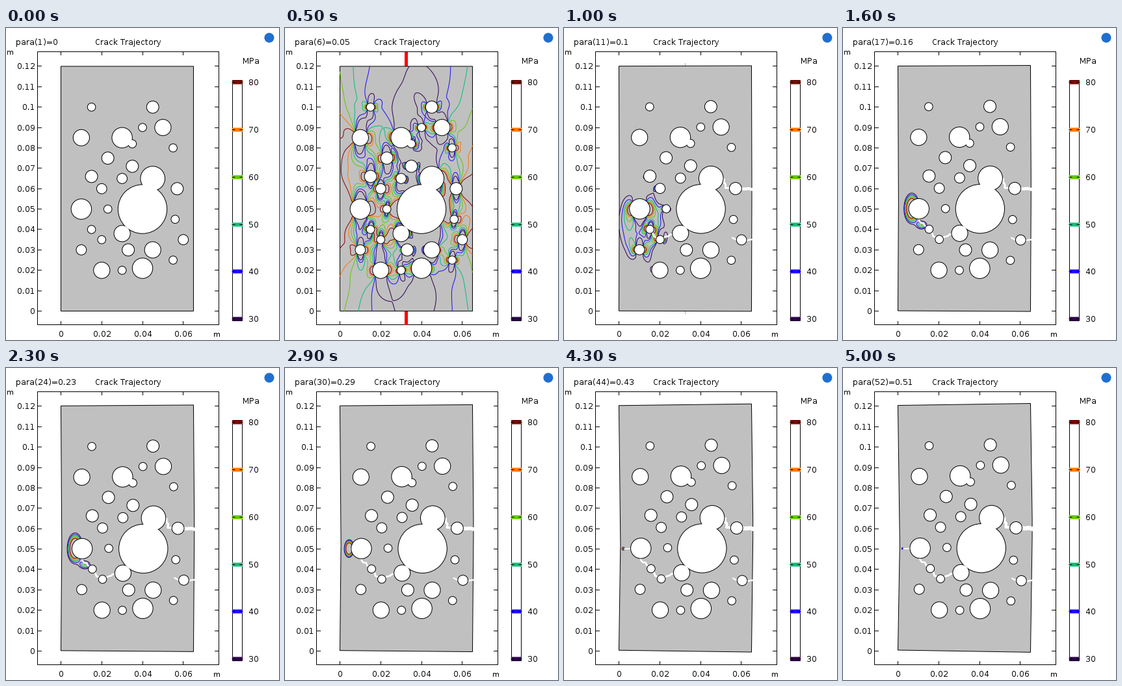
A matplotlib script that plays this animation: 420 by 480 pixels, repeating every 5.1 s.

```python
import numpy as np
import matplotlib.pyplot as plt
from matplotlib.animation import FuncAnimation
from matplotlib.patches import Circle, Polygon, Rectangle

plt.rcParams.update({"path.snap": False, "text.hinting": "native",
                     "text.hinting_factor": 1, "text.kerning_factor": 6,
                     "font.family": "DejaVu Sans"})

W, H, DPI = 420, 480, 100
PX = 72 / DPI                           # points per pixel
X0, Y0, SCALE = 84.5, 435.5, 3.138      # plate origin, pixels per mm
PLATE_W, PLATE_H = 65, 120
STEPS, BREAK = 51, 7

LEVELS = np.arange(30, 90, 10)
COLORS = ["#30004f", "#1e0aff", "#00c278", "#64c800", "#ff7800", "#8c0000"]

# hole centres by radius, in mm
CENTRES = {
    2: [(15, 100), (40, 90), (35, 82), (55, 80), (23, 50), (56, 45), (15, 40),
        (20, 35), (55, 25), (30, 20)],
    2.5: [(30, 65), (20, 60), (60, 35), (10, 30)],
    3: [(45, 100), (23, 75), (35, 71), (15, 66), (57, 60), (33, 30)],
    4: [(50, 90), (10, 85), (30, 38), (45, 30), (20, 20)],
    5: [(30, 85), (10, 50), (40, 21)],
    6: [(45, 65)],
    12: [(40, 50)],
}
HOLES = np.array([(x, y, r) for r, spots in CENTRES.items() for x, y in spots], float)

# line along which the plate parts, left edge to right edge
TRACK = np.array([(0, 49.7), (10, 50), (10.2, 44), (15, 40), (17, 36.5), (20, 35),
                  (25, 37.5), (30, 38), (40, 50), (45, 65), (51.3, 64.6),
                  (52, 60.3), (57, 60), (66, 60)])
SIDE = np.array([(55.6, 36), (60, 35), (66, 35)])


def jagged(points, rng):
    """Subdivide a path and shake the inner points."""
    out = [points[:1]]
    for a, b in zip(points, points[1:]):
        count = max(2, int(np.hypot(*(b - a)) / 1.2))
        t = np.linspace(0, 1, count + 1)[1:, None]
        shake = rng.normal(0, 0.25, (count, 2)) * (t < 1)
        out.append(a + (b - a) * t + shake)
    return np.vstack(out)


rng = np.random.default_rng(4)
# first step, line width, growth with opening, path
CRACKS = [(start, width, grow, jagged(points, rng)) for start, width, grow, points in [
    (7, 2.6, 1.5, TRACK[10:13]), (7, 4, 2.5, TRACK[12:]), (7, 2.4, 0, SIDE),
    (8, 2.5, 0.4, TRACK[5:8]), (9, 2.5, 0.4, TRACK[3:6]), (13, 2.3, 0.4, TRACK[1:4])]]


def hole_stress(x, y, hole, load):
    """Stress change around a circular hole in a uniform stress field."""
    dx, dy = x - hole[0], y - hole[1]
    q = np.minimum(hole[2] ** 2 / np.maximum(dx ** 2 + dy ** 2, 1e-6), 1)
    phi = np.arctan2(dy, dx)
    c, s = np.cos(2 * phi), np.sin(2 * phi)
    mean, dev, shear = (load[0] + load[1]) / 2, (load[0] - load[1]) / 2, load[2]
    normal = dev * c + shear * s
    rr = -mean * q + (3 * q ** 2 - 4 * q) * normal
    tt = mean * q - 3 * q ** 2 * normal
    rt = (2 * q - 3 * q ** 2) * (shear * c - dev * s)
    m, d = (rr + tt) / 2, (rr - tt) / 2
    return np.array([m + d * c - rt * s, m - d * c + rt * s, d * s + rt * c])


def far_stress(x, y):
    zero = np.zeros_like(x)
    waist = np.exp(-((y - 55) / 35) ** 2)
    return np.array([zero, 0.8 + (0.42 + 0.35 * waist) * ((x - 36) / 36) ** 2, zero])


def unit_stress(x, y):
    """First principal stress for a unit pull, with interacting holes."""
    hx, hy = HOLES[:, 0], HOLES[:, 1]
    loads = far_stress(hx, hy)
    for _ in range(4):
        new = far_stress(hx, hy)
        for i, hole in enumerate(HOLES):
            part = hole_stress(hx, hy, hole, loads[:, i])
            part[:, i] = 0
            new += part
        loads = (loads + new) / 2
    sx, sy, t = far_stress(x, y) + sum(
        hole_stress(x, y, h, loads[:, i]) for i, h in enumerate(HOLES))
    return (sx + sy) / 2 + np.hypot((sx - sy) / 2, t)


def bump(x, y, sx, sy, amp):
    return amp * np.exp(-((GX - x) / sx) ** 2 / 2 - ((GY - y) / sy) ** 2 / 2)


GX, GY = np.meshgrid(np.linspace(0, PLATE_W, 261), np.linspace(0, PLATE_H, 481))
PULL = unit_stress(GX, GY)
LEFT_PATCH = PULL * bump(12, 41, 7.5, 13, 60)


def ramp(n, start, end):
    return np.clip((n - start) / (end - start), 0, 1)


def ligament(n):
    """Centre, spreads and strength of the stress left of the last hole."""
    k, late = ramp(n, 24, 34), ramp(n, 34, 51)
    return (6.5 - 5 * k - 0.2 * late, 50.2 - 0.4 * k,
            2.1 - 1.6 * k - 0.15 * late, 4.1 - 3.45 * k - 0.3 * late,
            160 - 115 * late)


def stress(n):
    if n < BREAK:
        return 10 * n * PULL
    if n < 13:
        fade = 1 - ramp(n, 6, 10)
        return fade * PULL * bump(0, 60, 25, 60, 50) + (1 - fade) * LEFT_PATCH
    return bump(*ligament(n)) + bump(11.5, 42, 2, 1.6, 60 * (1 - ramp(n, 24, 28)))


def moved(x, y, s):
    """Pixel place of a plate point once the halves have swung open by s."""
    top = np.clip(0.5 + (y - np.interp(x, *TRACK.T)) / 8, 0, 1)
    u = x / PLATE_W
    px, py = X0 + SCALE * x, Y0 - SCALE * y
    dx = 0.0147 * SCALE * (top * (PLATE_H - y) + (1 - top) * y)
    up = top * (1.4 + 3 * u) + (1 - top) * (1.5 - 3.3 * u)
    return px + s * dx, py - s * up


def reset(ax):
    ax.cla()
    ax.set(xlim=(0, W), ylim=(H, 0))
    ax.axis("off")


def page_axes():
    ax = fig.add_axes([0, 0, 1, 1])
    reset(ax)
    return ax


def line(ax, xs, ys, color="black", width=1, **kw):
    ax.plot(xs, ys, color=color, lw=width * PX, **kw)


def frame(ax, left, top, right, bottom):
    ax.add_patch(Rectangle((left, top), right - left, bottom - top,
                           fill=False, ec="black", lw=PX))


def label(ax, x, y, text, size=12, **kw):
    ax.text(x, y, text, fontsize=size * PX, **kw)


def middle(v):
    """Centre of the pixel that holds v."""
    return np.floor(v) + 0.5


def draw_page(ax):
    label(ax, 137, 26, "Crack Trajectory")
    label(ax, 1.5, 41, "m", 11)
    label(ax, 319, 475, "m", 11)
    label(ax, 364, 55, "MPa")
    ax.add_patch(Circle((405, 15), 7.5, color="#1f6fd0", lw=0))

    left, top, right, bottom = 48.5, 36.5, 327.5, 456.5
    frame(ax, left, top, right, bottom)
    for i in range(13):
        y = middle(Y0 - 10 * i * SCALE)
        line(ax, [left, left + 6], [y, y])
        line(ax, [right - 6, right], [y, y])
        label(ax, 45, y + 4.5, f"{i / 100:g}", ha="right")
    for i in range(4):
        x = middle(X0 + 20 * i * SCALE)
        line(ax, [x, x], [top, top + 5])
        line(ax, [x, x], [bottom - 5, bottom])
        label(ax, x + 0.5, 475, f"{i / 50:g}", ha="center")

    frame(ax, 348.5, 80.5, 363.5, 450.5)
    for level, color in zip(LEVELS, COLORS):
        y = middle(447.7 - 7.28 * (level - 30))
        ax.add_patch(Rectangle((348, y - 3), 16, 6, color=color, lw=0))
        line(ax, [348, 352], [y, y])
        line(ax, [360, 364], [y, y])
        label(ax, 373, y + 4.5, str(level))


def draw_arrows(ax, n):
    """Pulling force, which all but vanishes after the break."""
    force = n if n < BREAK else 0.5 * (1 - ramp(n, 10, 14))
    length = min(10 * force, 22)
    for y in (59 - length, 435):
        ax.add_patch(Rectangle((186.5 - force / 2, y), force, length,
                               color="red", lw=0))


def draw_cracks(ax, n, s):
    for start, width, grow, path in CRACKS:
        if n >= start:
            line(ax, *moved(*path.T, s), "white", width + grow * s, zorder=4)
    if n > 24:
        tip = ligament(n)[0] + 0.7
        line(ax, *moved(np.array([10, tip]), np.array([50, 49.7]), s),
             "white", 2, zorder=4)


def draw_step(n):
    ax = stage
    reset(ax)
    value = n + (n == STEPS - 1)
    label(ax, 15, 26, f"para({value + 1})={value / 100:g}")
    draw_arrows(ax, n)

    s = value / STEPS if n >= BREAK else 0
    edge = np.array([(0, 0), (0, 49), (0, 51), (0, 120),
                     (65, 120), (65, 64), (65, 56), (65, 0)], float)
    ax.add_patch(Polygon(np.column_stack(moved(*edge.T, s)),
                         fc="#c0c0c0", ec="black", lw=PX, zorder=2))

    field = stress(n)
    shown = LEVELS[LEVELS < field.max()]
    if len(shown):
        ax.contour(*moved(GX, GY, s), field, levels=shown,
                   colors=COLORS[:len(shown)], linewidths=PX, zorder=3)

    draw_cracks(ax, n, s)
    # black discs below white ones, so that touching holes merge
    for x, y, r in zip(*moved(HOLES[:, 0], HOLES[:, 1], s), HOLES[:, 2] * SCALE):
        ax.add_patch(Circle((x, y), r + 0.5, color="black", lw=0, zorder=5))
        ax.add_patch(Circle((x, y), r - 0.5, color="white", lw=0, zorder=6))
    return []


fig = plt.figure(figsize=(W / DPI, H / DPI), dpi=DPI, facecolor="white")
draw_page(page_axes())
stage = page_axes()
anim = FuncAnimation(fig, draw_step, frames=STEPS, interval=100,
                     init_func=lambda: [], repeat=True, repeat_delay=0)
plt.show()
```
